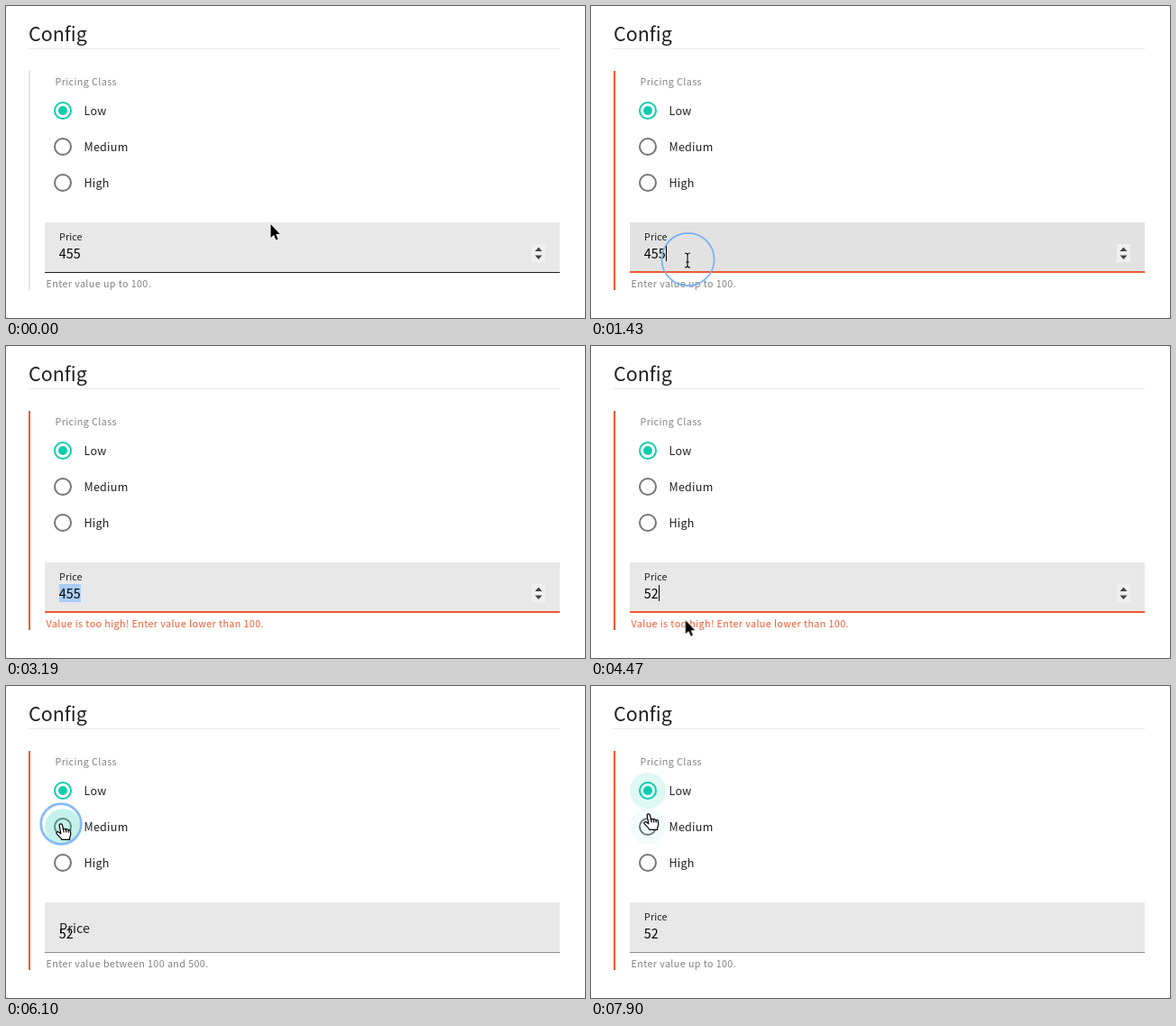
An HTML page for the animation above (8000 ms loop, 642x346 px).

```html
<!DOCTYPE html>
<html lang="en">
<head>
<meta charset="utf-8">
<title>Config form</title>
<style>
:root { --teal: #0dcdae; --gray: #757575; --alert: #ec5a31; --ink: #1f1f1f; --rule: #e5e5e5; }
html, body { margin: 0; width: 100%; height: 100%; overflow: hidden; background: #fff; }
svg { display: block; width: 642px; height: 346px; }

text {
  font-family: "Noto Sans CJK JP", "Noto Sans CJK SC", "Noto Sans CJK", "Open Sans", sans-serif;
  font-variant-ligatures: none;
  fill: var(--ink);
}
.title { font-size: 21.486px; }
.option { font-size: 12.534px; letter-spacing: .25px; }
.input { font-size: 14.324px; letter-spacing: .15px; }
.hint { font-size: 10.743px; letter-spacing: .4px; fill: #808080; }
.value { fill: #000; }
#error { fill: var(--alert); }

/* .move eases or fades, .step changes at once */
.move, .step { animation: 8s linear infinite; }
.step { animation-timing-function: step-end; }

#bar { fill: var(--rule); animation-name: bar; }
@keyframes bar {
  0%, 24.5%, 59% { fill: var(--rule); }
  16.625%, 35.625%, 76% { fill: var(--alert); }
}

#box { animation-name: box; }
@keyframes box {
  0%, 10.875%, 24.125%, 38.25%, 70.75%, 89.625% { fill: #e8e8e8; }
  .625%, 16.375%, 35%, 69.5%, 88.625% { fill: #e2e2e2; }
}

#line { animation-name: line; }
@keyframes line {
  0%, 69.5%, 88.625% { fill: #222; }
  10.875%, 59%, 70.75%, 89.625% { fill: #8c8c8c; }
  24.5% { fill: var(--alert); }
}

#focus { fill: var(--alert); transform-origin: 107px 295px; animation-name: focus; }
@keyframes focus {
  0%, 16.625% { transform: scaleX(0); }
  17.75%, 24.5% { transform: scaleX(1); }
  24.51%, 35.625% { transform: scaleX(0); }
  36.75%, 59% { transform: scaleX(1); }
  59.01%, 100% { transform: scaleX(0); }
}

#spin { animation-name: spin; }
@keyframes spin {
  0%, 16.375%, 35%, 69.5%, 88.625% { opacity: 1; }
  10.875%, 24.5%, 59%, 70.75%, 89.625% { opacity: 0; }
}

#label { animation-name: label; }
@keyframes label {
  0%, 76.18%, 78.125%, 95.62%, 97.5%, 100% { transform: translate(59px, 260px) scale(.75); }
  76.1875%, 76.35%, 95.625%, 95.75% { transform: translate(59px, 274px) scale(1); }
}

#v455 { animation-name: v455; }
#v5 { animation-name: v5; }
#v52 { animation-name: v52; }
@keyframes v455 { 0% { opacity: 1; } 50% { opacity: 0; } }
@keyframes v5 { 0%, 50.625% { opacity: 0; } 50% { opacity: 1; } }
@keyframes v52 { 0% { opacity: 0; } 50.625%, 100% { opacity: 1; } }

#mark { animation-name: mark; }
@keyframes mark {
  0%, 50% { x: 59px; width: 0; }
  36% { x: 75px; width: 8px; }
  36.5% { x: 67px; width: 16px; }
  37% { x: 59px; width: 24px; }
}

#caret { animation-name: caret; }
@keyframes caret {
  0%, 24.5%, 35.625%, 59% { x: 83px; opacity: 0; }
  16.625% { x: 83px; opacity: 1; }
  50% { x: 67px; opacity: 1; }
  50.625% { x: 75px; opacity: 1; }
}

#upto { animation-name: upto; }
#error { animation-name: error; }
#between { animation-name: between; }
@keyframes upto { 0%, 59%, 95.625% { opacity: 1; } 24.5%, 76.1875% { opacity: 0; } }
@keyframes error { 0%, 59% { opacity: 0; } 24.5% { opacity: 1; } }
@keyframes between { 0%, 95.625% { opacity: 0; } 76.1875% { opacity: 1; } }

.radio { fill: none; stroke: var(--gray); stroke-width: 2; }
.dot, .disc { fill: var(--teal); }
#low { animation-name: lowRing; }
#lowDot { animation-name: lowDot; }
#mid { animation-name: midRing; }
#midDot { animation-name: midDot; }
@keyframes lowRing {
  0%, 76.25%, 97.125%, 100% { stroke: var(--teal); }
  77.75%, 95.625% { stroke: var(--gray); }
}
@keyframes lowDot {
  0%, 76.25%, 97.125%, 100% { r: 5px; }
  77.75%, 95.625% { r: 0; }
}
@keyframes midRing {
  0%, 76.25%, 97.125%, 100% { stroke: var(--gray); }
  77.75%, 95.625% { stroke: var(--teal); }
}
@keyframes midDot {
  0%, 76.25%, 97.125%, 100% { r: 0; }
  77.75%, 95.625% { r: 5px; }
}

#lowDisc { animation-name: lowDisc; }
#midDisc { animation-name: midDisc; }
@keyframes lowDisc {
  0%, 92.25% { opacity: 0; }
  92.75%, 94.875% { opacity: .05; }
  95.5%, 96.875% { opacity: .24; }
  98.25%, 100% { opacity: .13; }
}
@keyframes midDisc {
  0%, 72.25% { opacity: 0; }
  72.875%, 75.625% { opacity: .05; }
  76.2%, 78.125% { opacity: .24; }
  80%, 95.625% { opacity: .12; }
  96.875%, 98.375% { opacity: 0; }
  98.625%, 100% { opacity: .05; }
}

.ring {
  fill: none; opacity: 0;
  animation: grow 8s cubic-bezier(.33, 1, .68, 1) infinite, fade 8s linear infinite;
  animation-delay: var(--at);
}
@keyframes grow {
  0% { r: 14px; stroke: #98c6fb; stroke-width: 4px; }
  2.75%, 100% { r: 32px; stroke: #72aaf0; stroke-width: 1.2px; }
}
@keyframes fade {
  0%, 1.4% { opacity: 1; }
  2.75%, 100% { opacity: 0; }
}

#pointer { animation-name: travel; animation-timing-function: ease-in-out; }
@keyframes travel {
  0%, .5% { transform: translate(293px, 242px); }
  2.375%, 8.375% { transform: translate(285px, 252px); }
  13.125%, 16.125% { transform: translate(105px, 320px); }
  16.625%, 23.75% { transform: translate(107px, 282px); }
  24.5%, 28.625% { transform: translate(254px, 319px); }
  29.75%, 32.75% { transform: translate(354px, 323px); }
  35.5%, 35.8% { transform: translate(87px, 277px); }
  37% { transform: translate(56px, 279px); }
  39.5%, 54.74% { transform: translate(-30px, 288px); }
  54.75% { transform: translate(30px, 300px); }
  58.5%, 68.5% { transform: translate(418px, 322px); }
  73.25%, 81.25% { transform: translate(61px, 153px); }
  82.5% { transform: translate(60px, 316px); }
  85.125%, 85.75% { transform: translate(200px, 318px); }
  86.25%, 88.125% { transform: translate(112px, 318px); }
  90.5% { transform: translate(85px, 159px); }
  92.875%, 97.25% { transform: translate(63px, 117px); }
  98.75%, 100% { transform: translate(64px, 142px); }
}

#arrow { animation-name: arrow; }
#beam { animation-name: beam; }
#hand { animation-name: hand; }
@keyframes arrow {
  0%, 24.125%, 54.75%, 81% { opacity: 1; }
  16.375%, 35%, 72.5%, 92.5% { opacity: 0; }
}
@keyframes beam {
  0%, 24.125%, 54.75% { opacity: 0; }
  16.375%, 35% { opacity: 1; }
}
@keyframes hand {
  0%, 81% { opacity: 0; }
  72.5%, 92.5%, 100% { opacity: 1; }
}
</style>
</head>
<body>
<svg viewBox="0 0 642 346">
  <defs>
    <path id="beamShape" d="M-3-8Q0-8 0-6Q0-8 3-8M0-6V6M-3 8Q0 8 0 6Q0 8 3 8M-2 2H2" fill="none"/>
  </defs>

  <text class="title" x="25" y="39">Config</text>
  <rect x="25" y="47" width="589" height="1" fill="#e8e8e8"/>
  <rect id="bar" class="step" x="25" y="72" width="2" height="243"/>

  <text class="hint" x="54.5" y="88">Pricing Class</text>
  <circle id="low" class="radio move" cx="63" cy="116" r="9"/>
  <circle id="lowDot" class="dot move" cx="63" cy="116" r="5"/>
  <circle id="mid" class="radio move" cx="63" cy="156" r="9"/>
  <circle id="midDot" class="dot move" cx="63" cy="156" r="0"/>
  <circle class="radio" cx="63" cy="196" r="9"/>
  <circle id="lowDisc" class="disc move" cx="63" cy="116" r="20"/>
  <circle id="midDisc" class="disc move" cx="63" cy="156" r="20"/>
  <text class="option" x="86.5" y="121">Low</text>
  <text class="option" x="86.5" y="161">Medium</text>
  <text class="option" x="86.5" y="201">High</text>

  <rect id="box" class="step" x="43" y="240" width="571" height="56"/>
  <rect id="line" class="step" x="43" y="295" width="571" height="1"/>
  <rect id="focus" class="move" x="43" y="294" width="571" height="2"/>
  <g id="spin" class="step">
    <rect x="583" y="264" width="15" height="20" fill="#f0f0f0"/>
    <path d="M586.5 272l4-4.5 4 4.5zM586.5 276.5h8l-4 4.5z" fill="#444"/>
  </g>
  <rect id="mark" class="step" x="59" y="264" width="0" height="20" fill="#a9cdf7"/>
  <text id="label" class="input move">Price</text>
  <text id="v455" class="input value step" x="58.7" y="280">455</text>
  <text id="v5" class="input value step" x="58.7" y="280">5</text>
  <text id="v52" class="input value step" x="58.7" y="280">52</text>
  <rect id="caret" class="step" x="83" y="265" width="1" height="18"/>

  <text id="upto" class="hint step" x="44.5" y="312">Enter value up to 100.</text>
  <text id="error" class="hint step" x="44.5" y="312">Value is too high! Enter value lower than 100.</text>
  <text id="between" class="hint step" x="44.5" y="312">Enter value between 100 and 500.</text>

  <circle class="ring" cx="107.5" cy="281" style="--at:1330ms"/>
  <circle class="ring" cx="255" cy="320" style="--at:1960ms"/>
  <circle class="ring" cx="87" cy="277" style="--at:2850ms"/>
  <circle class="ring" cx="418" cy="323" style="--at:4720ms"/>
  <circle class="ring" cx="61" cy="153" style="--at:6060ms"/>
  <circle class="ring" cx="63" cy="117" style="--at:7590ms"/>

  <g id="pointer" class="move">
    <path id="arrow" class="step" d="M.5 0V15L4 11.8 6.4 17.4 8.6 16.4 6.3 11H10.8Z" stroke="#fff" stroke-width="1.6" stroke-linejoin="round" paint-order="stroke"/>
    <g id="beam" class="step">
      <use href="#beamShape" stroke="#fff" stroke-width="2.6"/>
      <use href="#beamShape" stroke="#000" stroke-width="1.2"/>
    </g>
    <g id="hand" class="step" stroke="#000" stroke-width="1.2" stroke-linejoin="round" stroke-linecap="round">
      <path fill="#fff" d="M-1.9 1.2C-1.6-.6.9-.7 1.4 1L2.5 6C3 4.9 5 5 5.3 6.3 6 5.3 7.6 5.6 8 7 9 6.2 10.4 6.8 10.6 8.4 11 11 10.6 13 9.8 14.8L9.5 17.3H.8C0 15.3-2.5 13.3-5 10.6-5.8 9.2-3.8 8-2.2 9.2L-.2 10.8Z"/>
      <path fill="none" d="M2.5 6L3.2 9M5.3 6.3L5.8 9M8 7L8.3 9.2"/>
    </g>
  </g>
</svg>
</body>
</html>
```
